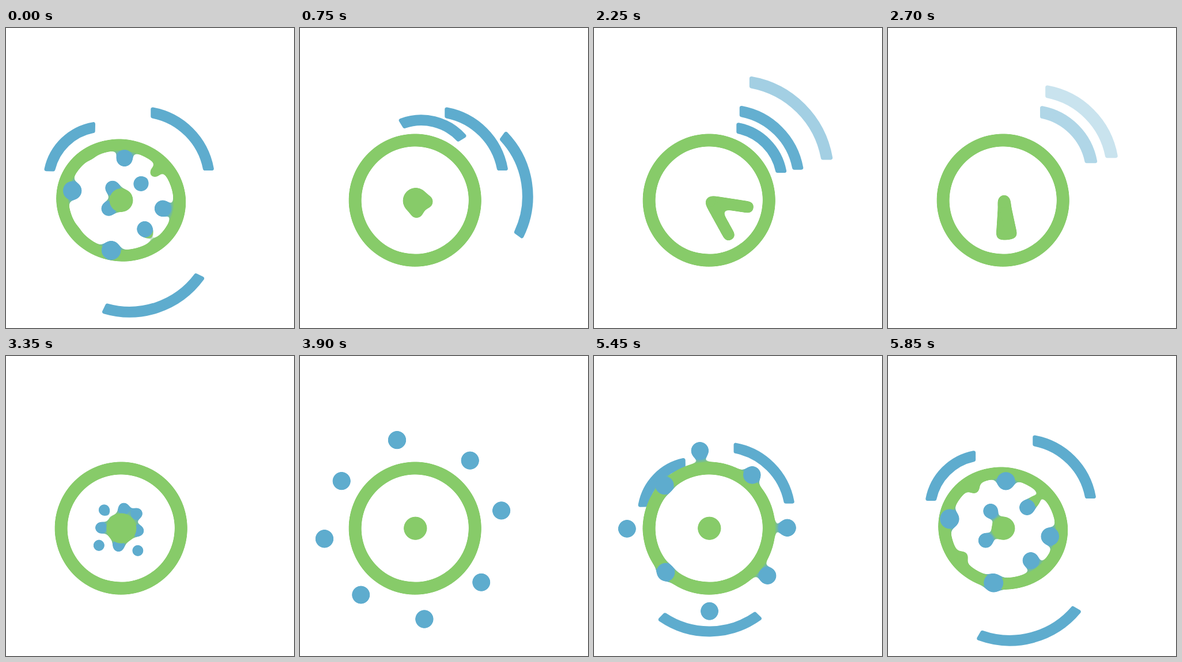
These frames come from a looping animation (500x520 px, 5900 ms). An HTML page:

```html
<!DOCTYPE html>
<html lang="en">
<head>
<meta charset="utf-8">
<title>Gooey clock</title>
<style>
  html, body { margin: 0; width: 100%; height: 100%; overflow: hidden; background: #fff; }
  svg { display: block; width: 500px; height: 520px; }
</style>
</head>
<body>
<svg viewBox="0 0 500 520">
  <defs>
    <filter id="goo" filterUnits="userSpaceOnUse" x="0" y="0" width="500" height="520" color-interpolation-filters="sRGB">
      <feGaussianBlur in="SourceGraphic" stdDeviation="6" result="blur"/>
      <feColorMatrix in="blur" values="1 0 0 0 0  0 1 0 0 0  0 0 1 0 0  0 0 0 20 -9.2" result="shape"/>
      <feComposite in="SourceGraphic" in2="shape" operator="atop"/>
    </filter>
  </defs>
  <g id="arcs"></g>
  <g id="blobs" filter="url(#goo)"></g>
</svg>
<script>
// Time runs from START to START + LOOP, so the dots leave first and the clock closes last.
const LOOP = 5900, START = 3050;
const BLUE = '#5eacce', GREEN = '#87cb69';
const CX = 199.7, CY = 298.6, ORBIT = 163.5;
const RAD = Math.PI / 180;
const arcLayer = document.getElementById('arcs');
const blobLayer = document.getElementById('blobs');

function set(el, attrs) {
  for (const name in attrs) el.setAttribute(name, attrs[name]);
}

function make(parent, tag, attrs) {
  const el = document.createElementNS('http://www.w3.org/2000/svg', tag);
  set(el, attrs);
  return parent.appendChild(el);
}

const clamp = (x, a, b) => Math.min(b, Math.max(a, x));
const linear = (t, a, b) => clamp((t - a) / (b - a), 0, 1);
const ease = (t, a, b) => (1 - Math.cos(Math.PI * linear(t, a, b))) / 2;
const bell = (x, mid, width) => Math.exp(-(((x - mid) / width) ** 2));
const polar = (x, y, r, deg) => [x + r * Math.cos(deg * RAD), y + r * Math.sin(deg * RAD)];

// Signal arcs: outer radius, first heading, span of the turn to north-east, start of the pulse.
const arcs = [
  { r: 104, from: -136, begin: 5750, end: 7250, pulse: 8200 },
  { r: 131, from: -45, begin: 0, end: 1, pulse: 8100 },
  { r: 160, from: 89.4, begin: 5466, end: 7282, pulse: 7800 }
];
for (const a of arcs) {
  a.el = make(arcLayer, 'path', { fill: BLUE, stroke: BLUE, 'stroke-width': 7, 'stroke-linejoin': 'round' });
}

function drawArc(a, t) {
  const heading = a.from + (-45 - a.from) * ease(t, a.begin, a.end);
  const left = 1 - linear(t, 5150, 5750);
  const grow = 1 - 0.32 * left ** 3;
  const away = 45.5 * (1 - left ** 2);
  const p = linear(t, a.pulse, a.pulse + 700) ** 1.2;
  const shift = 28.5 * p;
  const [ox, oy] = polar(CX, CY, away, heading);
  const x = ox + shift, y = oy - shift;

  // The caps lie at 45 degrees to the heading, a little off the radius.
  const pad = 3.5, outer = a.r * grow + shift;
  const ro = outer - pad, ri = outer * (1 - 18.8 / a.r) + pad;
  const half = r => 45 - Math.asin((outer * 0.148 + pad) / r) / RAD;
  const pt = (r, side) => polar(x, y, r, heading + side * half(r)).join(' ');
  set(a.el, {
    d: `M${pt(ro, -1)}A${ro} ${ro} 0 0 1 ${pt(ro, 1)}L${pt(ri, 1)}A${ri} ${ri} 0 0 0 ${pt(ri, -1)}Z`,
    opacity: linear(t, 5200, 5320) * (1 - p)
  });
}

// Eight dots on one orbit, each with its own head start in ms.
const dots = [135, 0, 325, 15, 325, 90, 235, 85].map((lead, i) => ({
  lead,
  base: i * 45 - 7 * Math.max(0, Math.cos((i - 5.4) * 60 * RAD))
}));

const ring = make(blobLayer, 'circle', { r: 104.25, fill: 'none', stroke: GREEN, 'stroke-width': 21.5 });
for (const d of dots) d.bump = make(blobLayer, 'circle', { fill: GREEN });
for (const d of dots) d.el = make(blobLayer, 'circle', { fill: BLUE });
const hands = [0, 1].map(() => make(blobLayer, 'line', { stroke: GREEN, 'stroke-width': 20 }));
const core = make(blobLayer, 'circle', { fill: GREEN });

function drawDot(d, t) {
  const s = (t - 4500) / 1000;
  const angle = d.base + 24.2 + 23.5 * s - 7 * Math.exp(-1.38 * s);
  const fall = Math.max(0, t - 4976 + d.lead) / 1000;
  const r = Math.max(0, ORBIT * ease(t + d.lead * 0.27, 3050, 4110) - 88 * fall ** 2);
  const swell = fall > 0 ? 2 * bell(r, 92, 15) : 0;
  const size = Math.min(13 + 0.022 * r, 9 + 7.5 * ease(t, 3050, 3950)) * Math.min(1, r / 22) + swell;
  const [x, y] = polar(CX, CY, r, angle);
  set(d.el, { cx: x, cy: y, r: size });

  // The rim is dragged inward behind a passing dot, then springs back.
  const stretch = Math.min(95, Math.max(r, 73 + Math.max(0, 49 - r)));
  const [bx, by] = polar(CX, CY, stretch, angle);
  set(d.bump, { cx: bx, cy: by, r: fall > 0 && r < 95 ? 10 * linear(r, 4, 29) : 0 });
}

function draw(t) {
  arcs.forEach(a => drawArc(a, t));
  dots.forEach(d => drawDot(d, t));

  const squash = ease(t, 5450, 5800) - ease(t, 5950, 6550);
  set(ring, {
    transform: `translate(${CX} ${CY}) rotate(14.5) scale(${1 - 0.018 * squash} ${1 - 0.082 * squash})`
  });

  const open = ease(t, 6500, 6850) - ease(t, 8500, 8950);
  const px = 200.3 + 1.5 * open, py = 298.6 + 1.9 * open;
  const turn = (t - 6650) / 1500;
  [85 + 283.4 * turn, 5 + 56 * turn].forEach((deg, i) => {
    const [x, y] = polar(px, py, 76 * open, deg);
    set(hands[i], { x1: px, y1: py, x2: x, y2: y });
  });
  set(core, {
    cx: px, cy: py,
    r: 20.7 + 5.4 * bell(t, 3350, 200) + 4 * bell(t, 6600, 250) - 11.6 * open ** 2
  });
}

const begin = performance.now();
function frame() {
  const t = (performance.now() - begin) % LOOP;
  draw(t < START ? t + LOOP : t);
  requestAnimationFrame(frame);
}
frame();
</script>
</body>
</html>
```
